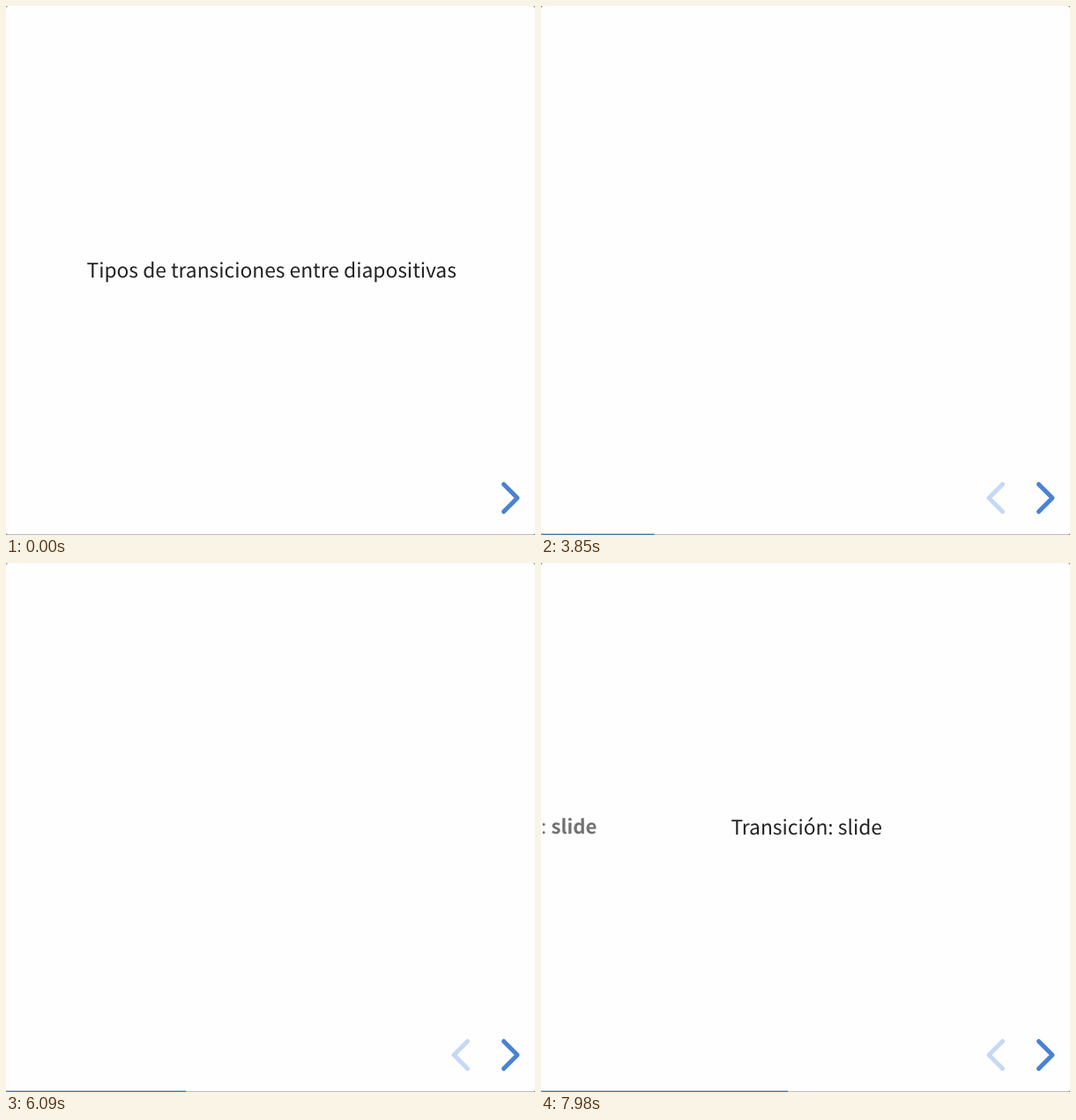
Recreate the animation shown at these times as an HTML page. Size 600x600 px, loop 8000 ms.

```html
<!DOCTYPE html>
<html lang="es">
<head>
<meta charset="utf-8">
<title>Transiciones</title>
<style>
  html, body { margin: 0; width: 100%; height: 100%; overflow: hidden; background: #fefefe; }
  svg { display: block; width: 100vw; height: 100vh; }
  text {
    font: 22.8px "Noto Sans CJK JP", "Noto Sans CJK SC", "Noto Sans CJK KR", "Noto Sans CJK", "Noto Sans", sans-serif;
    fill: #222; text-anchor: middle; text-rendering: geometricPrecision;
  }
  .strong { font-weight: 600; font-size: 22.2px; }
  .arrow { fill: none; stroke-width: 5; stroke-linecap: round; stroke-linejoin: round; }
</style>
</head>
<body>
<svg viewBox="0 0 600 600">
  <rect width="600" height="600" fill="#fefefe"/>
  <g id="slides"></g>
  <path id="prev" class="arrow" stroke="#c5d8f6" d="M523.5 542.5 508 558l15.5 15.5"/>
  <path class="arrow" stroke="#4a82d4" d="M564.5 542.5 580 558l-15.5 15.5"/>
  <rect y="599" width="600" height="1" fill="#bcbcbc"/>
  <rect id="bar" y="598.6" height="1.4" fill="#47759f"/>
  <path fill="#8a8a8a" d="M0 0h2L0 2zM600 0h-2l2 2zM0 600h2l-2-2zM600 600h-2l2-2z"/>
</svg>
<script>
const LOOP = 8000, TICK = 70, CENTER = 301.2;
const BAR_START = -2.8, BAR_STEP = 33.8, SLIDE_DISTANCE = 880;

// Each slide: start time, progress duration, label, emphasised word, transition.
const deck = [
  { at: -2000, dur: 900, label: 'Tipos de transiciones entre diapositivas' },
  { at: 900, dur: 800, label: 'Transición: none' },
  { at: 1740, dur: 800, label: 'Transición: ', strong: 'none' },
  { at: 2525, dur: 750, label: 'Transición: none' },
  { at: 3340, dur: 850, label: '' },
  { at: 4115, dur: 900, label: 'Transición: ', strong: 'fade', effect: 'fade' },
  { at: 5038, dur: 900, label: 'Transición: fade' },
  { at: 5990, dur: 850, label: '' },
  { at: 6860, dur: 900, label: 'Transición: ', strong: 'slide', effect: 'slide' },
  { at: 7771, dur: 900, label: 'Transición: slide' }
];

const $ = id => document.getElementById(id);
const clamp = v => Math.min(1, Math.max(0, v));

function make(name, parent, attrs, content) {
  const node = document.createElementNS('http://www.w3.org/2000/svg', name);
  for (const key in attrs) node.setAttribute(key, attrs[key]);
  node.textContent = content;
  return parent.appendChild(node);
}

for (const slide of deck) {
  const y = slide.strong ? 307 : 308;
  slide.node = make('text', $('slides'), { x: CENTER, y, 'xml:space': 'preserve' }, slide.label);
  if (slide.strong) make('tspan', slide.node, { class: 'strong' }, slide.strong);
}

// Cubic Bézier (.25, .1, .25, 1), solved by bisection.
function ease(x) {
  if (x <= 0 || x >= 1) return clamp(x);
  const curve = (p, q, s) => 3 * (1 - s) * (1 - s) * s * p + 3 * (1 - s) * s * s * q + s * s * s;
  let low = 0, high = 1;
  for (let i = 0; i < 24; i++) {
    const mid = (low + high) / 2;
    if (curve(.25, .25, mid) < x) low = mid; else high = mid;
  }
  return curve(.1, 1, low);
}

const progress = (slide, t) => slide ? ease((t - slide.at) / slide.dur) : 0;

function render(t) {
  let barEnd = BAR_START;
  deck.forEach((slide, i) => {
    const next = deck[i + 1];
    const entered = progress(slide, t), left = progress(next, t);
    let opacity = t >= slide.at && !(next && t >= next.at) ? 1 : 0;
    let shift = 0;
    if (slide.effect) opacity = entered * (1 - left);
    if (slide.effect === 'slide') shift = SLIDE_DISTANCE * (1 - entered - left);
    slide.node.setAttribute('opacity', opacity);
    slide.node.setAttribute('transform', `translate(${shift} 0)`);
    if (i) barEnd += BAR_STEP * entered;
  });
  $('bar').setAttribute('width', Math.max(0, barEnd));
  $('prev').setAttribute('opacity', clamp((t - deck[1].at) / 200));
}

function frame() {
  const t = performance.now() % LOOP;
  render(Math.floor(t / TICK) * TICK);
  requestAnimationFrame(frame);
}
frame();
</script>
</body>
</html>
```
